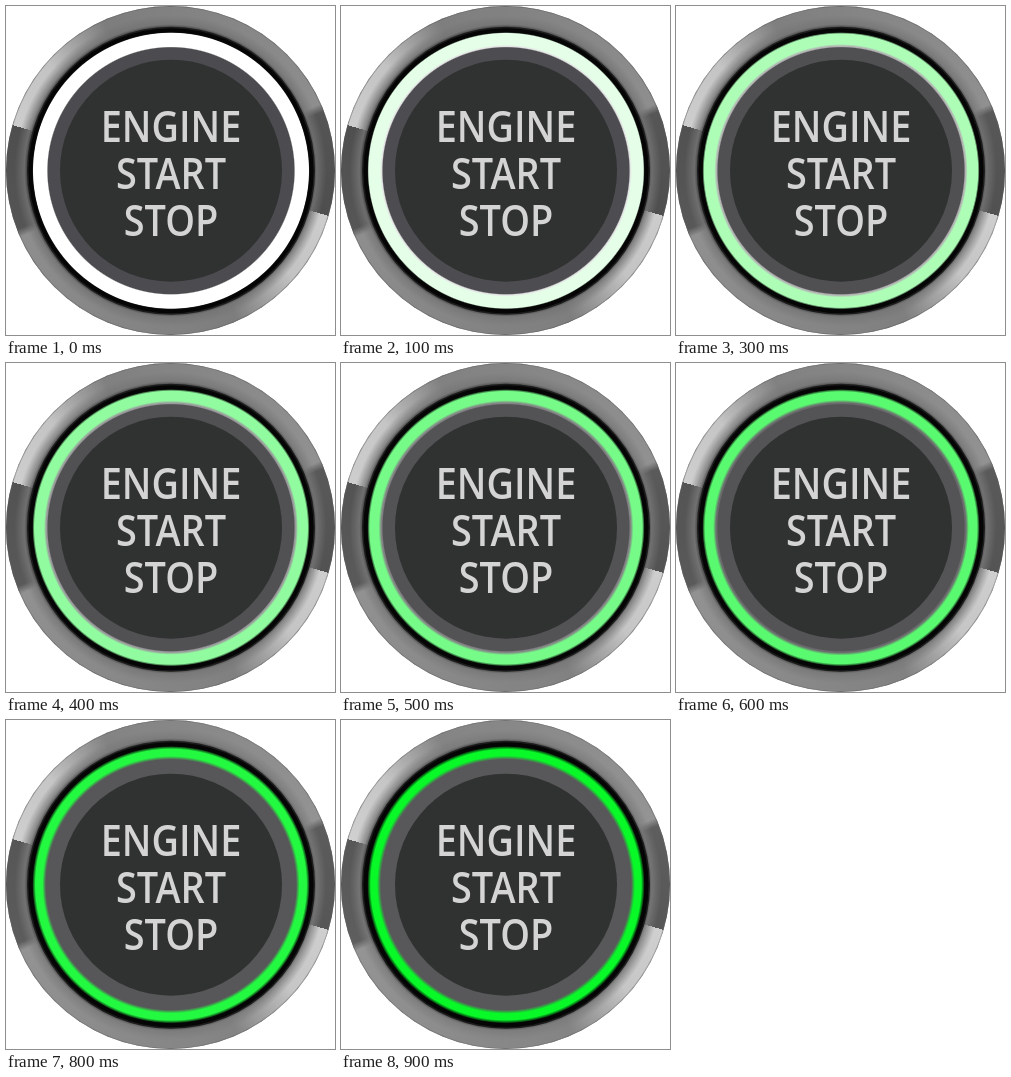
Recreate the animation shown at these times as an HTML page with a canvas. Size 329 by 329 pixels, loop 1 s.

```html
<!DOCTYPE html>
<html lang="en">
<head>
<meta charset="utf-8">
<title>Engine button</title>
<style>
html, body { margin: 0; width: 100%; height: 100%; overflow: hidden; background: #fff; }
canvas { display: block; width: 329px; height: 329px; }
</style>
</head>
<body>
<canvas id="stage" width="329" height="329"></canvas>
<script>
const ctx = document.getElementById('stage').getContext('2d');
const SIZE = 329, MID = SIZE / 2, CX = 165, CY = 164.7;
const STEPS = 10, STEP_MS = 100;
const CONDENSE = 0.87;

const rad = deg => deg * Math.PI / 180;
const mix = (a, b, t) => a + (b - a) * t;
const blend = (a, b, t) => a.map((v, i) => Math.round(mix(v, b[i], t)));
const rgb = c => `rgb(${c})`;
const grey = (v, a = 1) => `rgba(${v},${v},${v},${a})`;

function disc(x, y, r, fill) {
  ctx.fillStyle = fill;
  ctx.beginPath();
  ctx.arc(x, y, r, 0, 2 * Math.PI);
  ctx.fill();
}

// The chrome reflection repeats every half turn: bright, plain, then dark.
function reflection() {
  const g = ctx.createConicGradient(rad(16), MID, MID);
  const stop = (deg, v) => g.addColorStop(deg / 360, grey(v));
  for (const turn of [0, 180]) {
    stop(turn, 205);
    stop(turn + 25, 195);
    stop(turn + 50, 125);
    stop(turn + 140, 142);
    stop(turn + 143, 85);
    stop(turn + 180, 78);
  }
  return g;
}

function shade() {
  const g = ctx.createRadialGradient(MID, MID, 143, MID, MID, 164.5);
  g.addColorStop(0, grey(60, 0.9));
  g.addColorStop(0.15, grey(115, 0.8));
  g.addColorStop(0.45, grey(115, 0.25));
  g.addColorStop(0.6, grey(115, 0));
  g.addColorStop(0.93, grey(100, 0));
  g.addColorStop(1, grey(70, 0.7));
  return g;
}

function chrome(t) {
  disc(MID, MID, 164.5, reflection());
  disc(MID, MID, 164.5, shade());
  disc(MID, MID, 164.5, grey(255, 0.05 * t));
  disc(CX, CY, 144, '#1c1c1c');
  disc(CX, CY, 142.5, '#050505');
}

// The lit ring turns from white to green while its inner edge dims to grey.
function glow(t) {
  const outer = 138.5;
  const core = blend([255, 255, 255], [8, 248, 40], t);
  const face = blend([76, 76, 80], [88, 88, 90], t);
  const edge = blend([255, 255, 255], face, Math.min(1, 1.3 * t));
  const g = ctx.createRadialGradient(CX, CY, 0, CX, CY, outer);
  const stop = (r, c) => g.addColorStop(r / outer, rgb(c));
  stop(123, face);
  stop(124.2, edge);
  stop(mix(124.4, 125.2, t), edge);
  stop(mix(125.4, 129, t), core);
  stop(mix(137.5, 135.2, t), core);
  stop(outer, blend(core, [5, 5, 5], 0.9));
  disc(CX, CY, outer, g);
}

function label() {
  ctx.save();
  ctx.translate(CX, 135.6);
  ctx.scale(CONDENSE, 1);
  ctx.font = '600 43.5px "Open Sans", "Noto Sans", sans-serif';
  ctx.textAlign = 'center';
  ctx.fillStyle = '#d4d4d4';
  ['ENGINE', 'START', 'STOP'].forEach((word, i) => ctx.fillText(word, 0, 47.1 * i));
  ctx.restore();
}

function draw(step) {
  const t = step / (STEPS - 1);
  ctx.clearRect(0, 0, SIZE, SIZE);
  chrome(t);
  glow(t);
  disc(CX, CY, 111, '#303131');
  label();
}

function tick() {
  draw(Math.floor(performance.now() / STEP_MS) % STEPS);
  requestAnimationFrame(tick);
}
tick();
</script>
</body>
</html>
```
